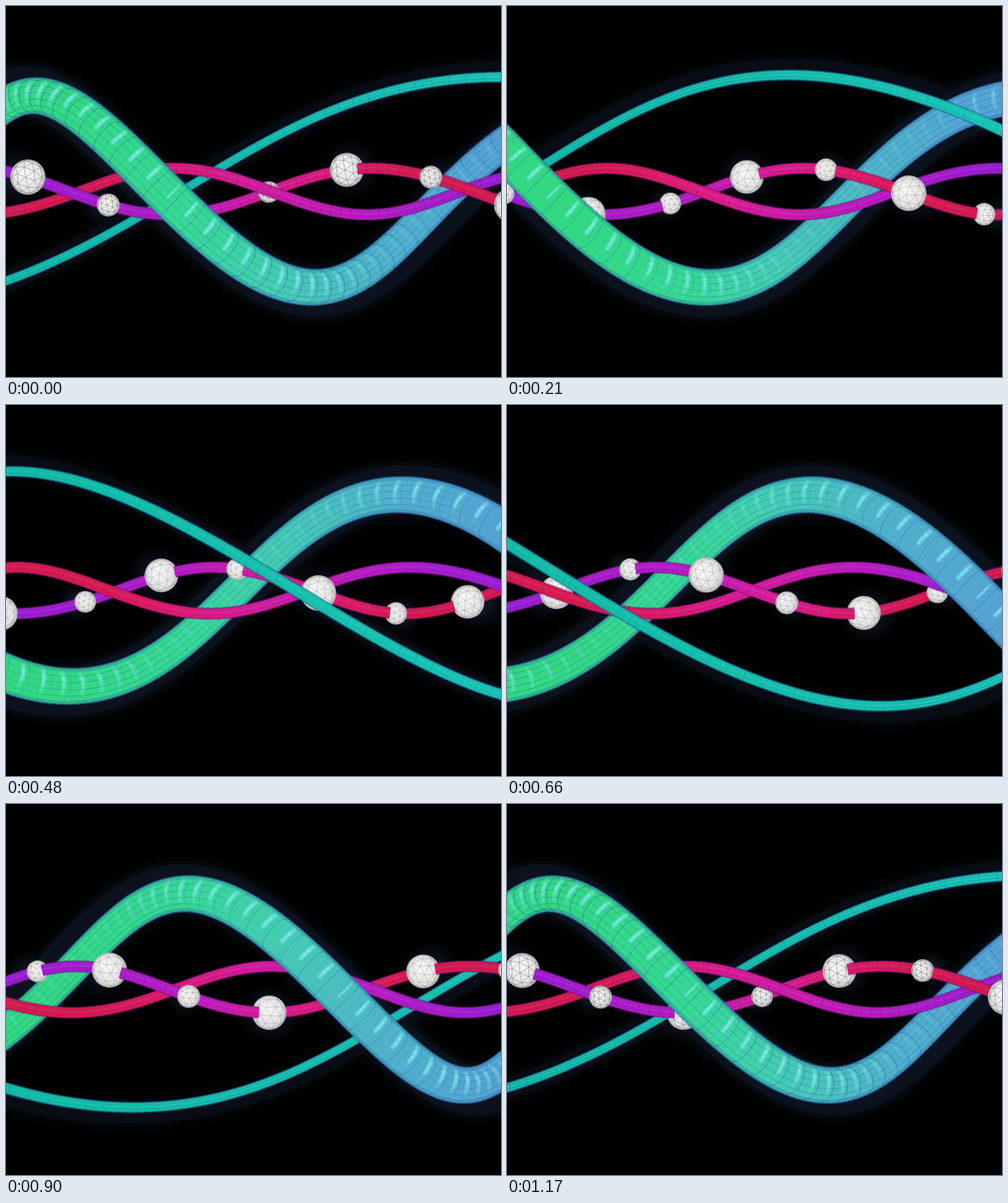
An HTML page with a canvas for the animation above (1.2 s loop, 800 by 600 pixels).

```html
<!DOCTYPE html>
<html lang="en">
<head>
<meta charset="utf-8">
<title>Rotating helices</title>
<style>
html, body { margin: 0; width: 100%; height: 100%; overflow: hidden; background: #000; }
canvas { display: block; width: 800px; height: 600px; }
</style>
</head>
<body>
<canvas id="stage" width="800" height="600"></canvas>
<script>
const ctx = document.getElementById('stage').getContext('2d');
const TAU = Math.PI * 2, LOOP = 1200, CX = 400, CY = 300, EYE = 1190;
const RING = 24.2, STEP = RING / 3, HALF = 66;

const PURPLE = [150, 30, 214], VIOLET = [184, 28, 196], PINK = [216, 28, 150], ROSE = [221, 26, 104], RED = [214, 26, 78];
const tubes = [
  { kind: 'big', amp: 153.7, len: 966, x0: 33, r: 28.3, yaw: 0, every: 3,
    stops: [[100, [50, 217, 130]], [300, [54, 217, 148]], [440, [68, 205, 178]], [620, [80, 178, 203]], [800, [86, 162, 212]]],
    edge: [38, 105, 160], mesh: '40,88,172' },
  { kind: 'thin', amp: 186.6, len: 1940, x0: 751, r: 7.5, yaw: 0.02, every: 3,
    stops: [[0, [16, 188, 164]], [800, [24, 196, 178]]],
    edge: [20, 104, 145], mesh: '24,86,160' },
  { kind: 'cord', amp: 37.5, len: 635, x0: 587, r: 8.6, yaw: 0, every: 2,
    stops: [[0, PURPLE], [300, VIOLET], [420, PINK], [550, ROSE], [650, RED]],
    edge: [120, 18, 112], mesh: '100,16,130' },
  { kind: 'cord', amp: 37.5, len: 635, x0: 269.5, r: 8.6, yaw: 0, every: 2,
    stops: [[150, RED], [250, ROSE], [380, PINK], [580, VIOLET], [800, PURPLE]],
    edge: [120, 18, 112], mesh: '100,16,130' }
];
const [big, thin, beads] = tubes;

const clamp = v => Math.max(0, Math.min(1, v));
const mix = (a, b, k) => a + (b - a) * k;
const rgb = (c, a = 1) => `rgba(${c.map(Math.round).join(',')},${a})`;
const blend = (a, b, k) => a.map((v, i) => mix(v, b[i], k));

function ramp(stops, x) {
  if (x <= stops[0][0]) return stops[0][1];
  for (let i = 1; i < stops.length; i++) {
    const [a, from] = stops[i - 1], [b, to] = stops[i];
    if (x <= b) return blend(from, to, (x - a) / (b - a));
  }
  return stops[stops.length - 1][1];
}

// A point on a helix around the x axis, seen in perspective.
function locate(tube, X, turn) {
  const a = TAU * ((X - tube.x0) / tube.len + turn);
  const amp = tube.amp * (1 - tube.yaw * (X - CX) / CX);
  const z = amp * Math.sin(a), s = EYE / (EYE - z), w = amp * TAU / tube.len;
  return {
    x: CX + (X - CX) * s, y: CY - amp * Math.cos(a) * s, z, s,
    front: Math.sin(a), lean: w * Math.cos(a) / Math.hypot(1, w)
  };
}

function trace(tube, turn) {
  const pts = [];
  for (let i = -HALF; i <= HALF; i++) pts.push({ i, ...locate(tube, CX + i * STEP, turn) });
  pts.forEach((p, k) => {
    const a = pts[Math.max(0, k - 1)], b = pts[Math.min(pts.length - 1, k + 1)];
    const d = Math.hypot(b.x - a.x, b.y - a.y);
    p.tx = (b.x - a.x) / d;
    p.ty = (b.y - a.y) / d;
  });
  return pts;
}

// u: offset across the tube from -1 to 1; v: bulge along it
const onTube = (p, r, u, v = 0) => [
  p.x + r * p.s * (u * p.ty - v * p.lean * p.tx),
  p.y - r * p.s * (u * p.tx + v * p.lean * p.ty)
];

function arc(p, r, from, to, style, width) {
  ctx.beginPath();
  for (let k = 0; k <= 10; k++) {
    const u = mix(from, to, k / 10);
    ctx.lineTo(...onTube(p, r, u, Math.sqrt(1 - u * u)));
  }
  ctx.strokeStyle = style;
  ctx.lineWidth = width;
  ctx.stroke();
}

function band(p, q, r, lo, hi, style) {
  const e = 0.6;
  const at = (o, u, k) => {
    const [x, y] = onTube(o, r, u);
    return [x + k * e * o.tx, y + k * e * o.ty];
  };
  ctx.beginPath();
  ctx.moveTo(...at(p, lo, -1));
  ctx.lineTo(...at(q, lo, 1));
  ctx.lineTo(...at(q, hi, 1));
  ctx.lineTo(...at(p, hi, -1));
  ctx.fillStyle = style;
  ctx.fill();
}

// Each ring of facets catches light on a few of them.
function shine(p, r, near) {
  const lit = mix(0.25, 1, clamp((p.front + 0.6) / 0.9));
  const size = 0.09 + 0.03 * near;
  ctx.lineCap = 'round';
  for (const [u, k] of [[0.62, 0.25 + 0.25 * near], [0.36, 0.6], [0.04, 0.4 + 0.2 * near], [-0.3, 0.35 * (1 - near)]]) {
    const a = k * lit;
    arc(p, r, u - size, u + size, `rgba(125,232,240,${a * 0.5})`, 9);
    arc(p, r, u - size, u + size, `rgba(145,243,246,${a * 0.8})`, 4.5);
  }
  ctx.lineCap = 'butt';
}

function drawPiece(tube, p, q, sharp) {
  const { kind, r, edge, mesh } = tube;
  const color = ramp(tube.stops, (p.x + q.x) / 2);
  const near = Math.max(0, p.front), rim = 1 + 1.5 / r;
  band(p, q, r, -rim, rim, rgb(edge, kind === 'cord' ? 0.4 : 0.55));
  band(p, q, r, -1, 1, rgb(blend(color, edge, 0.35)));
  band(p, q, r, -0.86, 0.88, rgb(color));
  if (kind !== 'big') band(p, q, r, 0, 0.45, rgb(blend(color, [255, 255, 255], 0.05)));

  const soft = kind === 'big' ? 1 : 0.55;
  const lines = kind === 'big' ? 8 : 4;
  ctx.beginPath();
  for (let j = 0; j < lines; j++) {
    const u = Math.cos(Math.PI * (j + 0.5) / lines);
    ctx.moveTo(...onTube(p, r, u));
    ctx.lineTo(...onTube(q, r, u));
  }
  ctx.strokeStyle = `rgba(${mesh},${soft * mix(0.55 * (1 - near), 0.5, sharp)})`;
  ctx.lineWidth = 0.9;
  ctx.stroke();

  if (kind === 'big' && p.i % 3 === 0) shine(p, r, near);
  const slot = tube.every === 3 ? 1 : 0;
  if ((p.i + 99) % tube.every === slot) {
    const alpha = soft * mix(0.08 + 0.45 * near, 0.6, sharp);
    arc(p, r, -1, 1, `rgba(${mesh},${alpha})`, 1);
  }
}

// Icosahedron with every face split in four
const ball = (() => {
  const g = (1 + Math.sqrt(5)) / 2, base = [];
  for (const a of [-1, 1]) for (const b of [-g, g]) base.push([0, a, b], [a, b, 0], [b, 0, a]);
  const dist = (a, b) => Math.hypot(a[0] - b[0], a[1] - b[1], a[2] - b[2]);
  const unit = v => v.map(c => c / Math.hypot(...v));
  const mid = (a, b) => unit(a.map((c, i) => c + b[i]));
  const joined = (a, b) => Math.abs(dist(a, b) - 2) < 0.01;
  const edges = [];
  base.forEach((a, i) => base.forEach((b, j) => {
    if (j <= i || !joined(a, b)) return;
    const m = mid(a, b);
    edges.push([unit(a), m], [m, unit(b)]);
    base.forEach((c, k) => {
      if (k <= j || !joined(a, c) || !joined(b, c)) return;
      const n = mid(b, c), o = mid(a, c);
      edges.push([m, n], [n, o], [o, m]);
    });
  }));
  return edges;
})();

function spin([x, y, z], a, b) {
  const y1 = y * Math.cos(a) - z * Math.sin(a), z1 = y * Math.sin(a) + z * Math.cos(a);
  return [x * Math.cos(b) + z1 * Math.sin(b), y1, z1 * Math.cos(b) - x * Math.sin(b)];
}

function drawBall(p, sharp, turn) {
  const { x, y, r } = p;
  const g = ctx.createRadialGradient(x - r * 0.2, y - r * 0.25, r * 0.2, x, y, r);
  g.addColorStop(0, '#f4f4f4');
  g.addColorStop(0.75, '#e4e4e3');
  g.addColorStop(1, '#bcbcbe');
  ctx.beginPath();
  ctx.arc(x, y, r, 0, TAU);
  ctx.fillStyle = g;
  ctx.fill();
  ctx.beginPath();
  for (const pair of ball) {
    const [a, b] = pair.map(v => spin(v, 0.35 + turn * TAU, 0.4));
    if (a[2] + b[2] < 0) continue;
    ctx.moveTo(x + a[0] * r, y + a[1] * r);
    ctx.lineTo(x + b[0] * r, y + b[1] * r);
  }
  ctx.strokeStyle = `rgba(105,105,110,${mix(0.36, 0.62, sharp)})`;
  ctx.lineWidth = 0.9;
  ctx.stroke();
}

function halo(pts, width, style) {
  ctx.beginPath();
  for (const p of pts) ctx.lineTo(CX + (p.x - CX) * 1.05, CY + (p.y - CY) * 1.05);
  ctx.lineWidth = width;
  ctx.strokeStyle = style;
  ctx.stroke();
}

function draw(ms) {
  const turn = (ms % LOOP) / LOOP;
  const gap = Math.min(turn, 1 - turn) * LOOP;
  const sharp = 1 - clamp((gap - 30) / 90);
  ctx.fillStyle = '#000';
  ctx.fillRect(0, 0, 800, 600);
  ctx.lineJoin = 'round';

  const paths = tubes.map(t => trace(t, turn));
  const items = [];
  for (let k = -7; k < 8; k++) {
    const p = locate(beads, 44 + 127 * (k + 4 * turn), turn);
    p.r = (k % 2 ? 18 : 27.8) * p.s;
    items.push({ z: p.z + p.r * 0.2, draw: () => drawBall(p, sharp, turn) });
    const hx = CX + (p.x - CX) * 1.05, hy = CY + (p.y - CY) * 1.05;
    const g = ctx.createRadialGradient(hx, hy, p.r * 0.6, hx, hy, p.r * 1.9);
    g.addColorStop(0, 'rgba(16,23,36,.9)');
    g.addColorStop(1, 'rgba(8,12,20,0)');
    ctx.fillStyle = g;
    ctx.fillRect(hx - 60, hy - 60, 120, 120);
  }
  for (const [t, w, fade] of [[big, 80, 1], [thin, 34, 0.6]]) {
    const path = paths[tubes.indexOf(t)];
    halo(path, w + 30, `rgba(8,12,19,${0.3 * fade})`);
    halo(path, w + 12, `rgba(10,15,24,${0.4 * fade})`);
    halo(path, w, `rgba(12,18,29,${fade})`);
  }
  paths.forEach((pts, n) => {
    for (let k = 0; k + 1 < pts.length; k++) {
      const p = pts[k], q = pts[k + 1];
      if (Math.max(p.x, q.x) < -40 || Math.min(p.x, q.x) > 840) continue;
      items.push({ z: (p.z + q.z) / 2, draw: () => drawPiece(tubes[n], p, q, sharp) });
    }
  });
  items.sort((a, b) => a.z - b.z).forEach(o => o.draw());
}

const start = performance.now();
function tick() {
  draw(performance.now() - start);
  requestAnimationFrame(tick);
}
tick();
</script>
</body>
</html>
```
